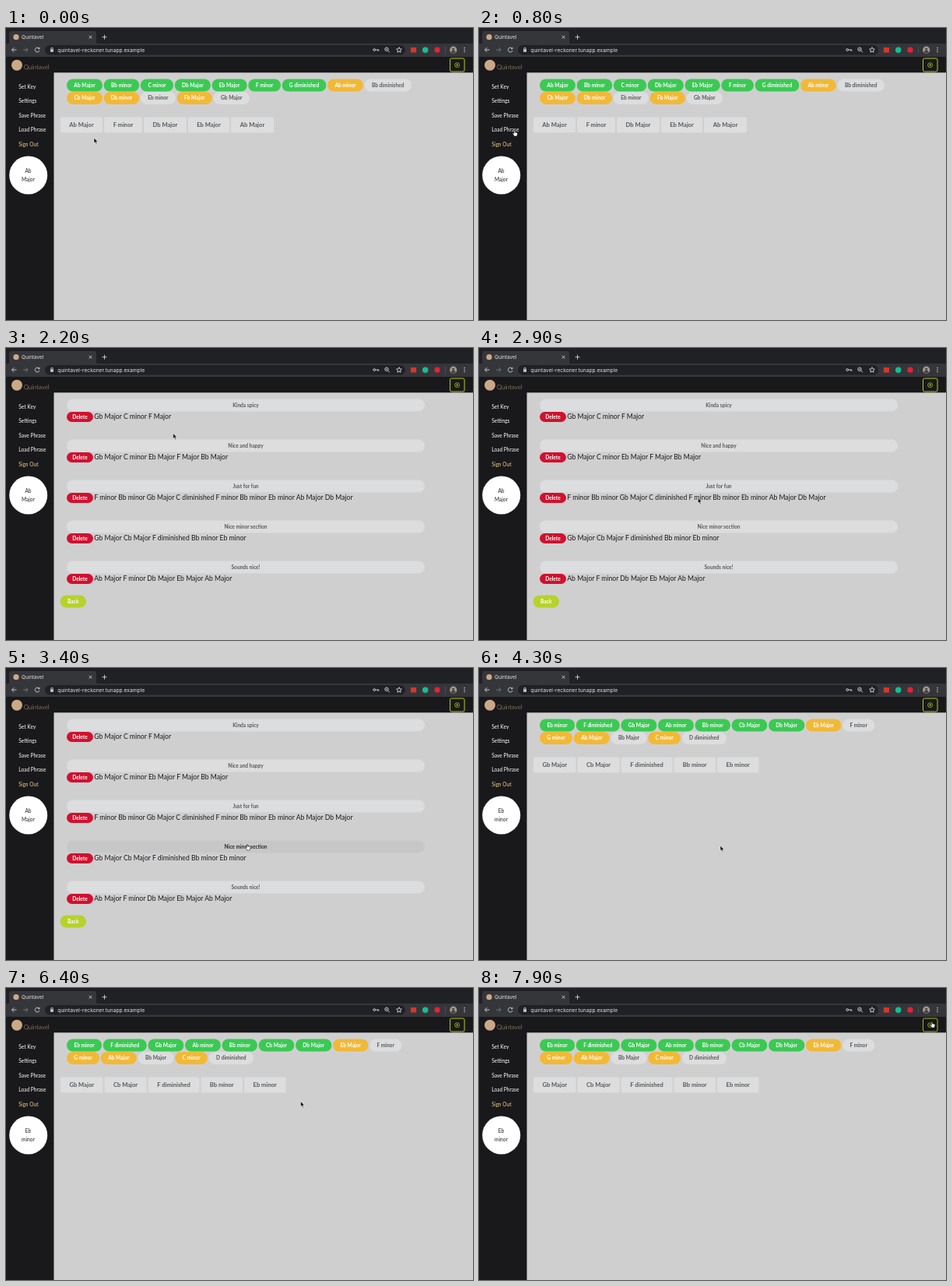
Recreate the animation shown at these times as an HTML page. Size 600x375 px, loop 8 s.

```html
<!DOCTYPE html>
<html lang="en">
<head>
<meta charset="utf-8">
<title>Quintavel</title>
<style>
  html, body { margin: 0; width: 100%; height: 100%; overflow: hidden; background: #d0cfd0; }
  svg { display: block; width: 600px; height: 375px; font-family: Lato, sans-serif; }
  text { pointer-events: none; white-space: pre; }
  text.hot { pointer-events: auto; }
  rect.on { filter: brightness(.9); }
  .grey.on + text { fill: #2b2b2c; }
  .line { fill: none; stroke: #d5d7da; stroke-width: .9; }
  .ui { font-family: Inter, sans-serif; }
  #cursor { pointer-events: none; }
</style>
</head>
<body>
<svg id="stage" viewBox="0 0 600 375"></svg>
<script>
const GREEN = '#3bc954', AMBER = '#f2b937', GREY = '#dcddde', INK = '#58595a', TAN = '#cba984';
const LOOP = 8000, LIST_AT = 1200, NEW_KEY_AT = 4200;

const rect = (x, y, w, h, fill, r = 0, extra = '') =>
  `<rect x="${x}" y="${y}" width="${w}" height="${h}" rx="${r}" fill="${fill}" ${extra}/>`;
const circle = (x, y, r, fill) => `<circle cx="${x}" cy="${y}" r="${r}" fill="${fill}"/>`;
const line = (d, extra = '') => `<path class="line" d="${d}" ${extra}/>`;
// Text is placed by the vertical centre of its capitals.
const text = (x, y, size, fill, str, extra = '') =>
  `<text x="${x}" y="${y + size * .36}" font-size="${size}" fill="${fill}" ${extra}>${str}</text>`;

function button(x, y, w, h, fill, label, size = 6.6, r = h / 2) {
  const grey = fill === GREY;
  return rect(x, y, w, h, fill, r, `class="hot ${grey ? 'grey' : ''}"`) +
    text(x + w / 2, y + h / 2, size, grey ? INK : '#fff', label, 'font-weight="700" text-anchor="middle"');
}

// Each edge list holds the left side of every button plus the end of the row.
function row(labels, edges, y, h, fillOf, gap, size, r) {
  return labels.split(',').map((label, i) =>
    button(edges[i], y, edges[i + 1] - edges[i] - gap, h, fillOf(i), label, size, r)).join('');
}

function chordScene(id, key, top, topEdges, nextFrom, low, lowEdges, phrase, phraseEdges) {
  const [root, mode] = key.split(' ');
  const middle = 'text-anchor="middle"';
  return `<g id="${id}">` +
    row(top, topEdges, 65.5, 16, i => i < 7 ? GREEN : i === 7 ? AMBER : GREY, 1.6) +
    row(low, lowEdges, 82, 16, i => nextFrom.includes(i) ? AMBER : GREY, 1.6) +
    row(phrase, phraseEdges, 114.5, 20, () => GREY, 2, 7.6, 1.5) +
    `</g><g id="${id}Key">` + text(28.5, 183.5, 6.6, '#222', root, middle) +
    text(28.5, 195, 6.6, '#222', mode, middle) + '</g>';
}

const saved = [
  ['Kinda spicy', 'Gb Major C minor F Major'],
  ['Nice and happy', 'Gb Major C minor Eb Major F Major Bb Major'],
  ['Just for fun', 'F minor Bb minor Gb Major C diminished F minor Bb minor Eb minor Ab Major Db Major'],
  ['Nice minor section', 'Gb Major Cb Major F diminished Bb minor Eb minor'],
  ['Sounds nice!', 'Ab Major F minor Db Major Eb Major Ab Major']
];

const listScene = '<g id="list">' + saved.map(([title, chords], i) => {
  const y = 65.5 + i * 52;
  return button(78, y, 460, 16, GREY, title) +
    button(78, y + 16.5, 34, 13, '#d0112f', 'Delete') +
    text(113.3, y + 22.5, 8.65, '#18181a', chords);
}).join('') + button(69.5, 317.5, 33.5, 16, '#b6d22c', 'Back') + '</g>';

const browser =
  rect(0, 0, 600, 21, '#202124') +
  '<path d="M1 21Q4 21 4 18V7Q4 4 7 4H113Q116 4 116 7V18Q116 21 119 21Z" fill="#35363a"/>' +
  rect(0, 20, 600, 17, '#35363a') + rect(50, 22, 463, 12.5, '#202124', 6.2) +
  circle(13, 11.7, 3.6, TAN) +
  text(20, 11.7, 6.4, '#dfe1e5', 'Quintavel', 'class="ui"') +
  line('M106.7 9.9l3.6 3.6m0-3.6l-3.6 3.6M123.5 11.7h6m-3-3v6') +
  line('M13.5 28H7.5m2.8-2.8L7.5 28l2.8 2.8') +
  line('M22 28h6m-2.8-2.8L28 28l-2.8 2.8', 'opacity=".4"') +
  line('M42.5 26.2A2.9 2.9 0 1 0 43 29M43 24.8v2h-2') +
  rect(57, 27.3, 4, 3.4, '#c4c7cb', .5) + line('M57.8 27.5v-1a1.2 1.2 0 0 1 2.4 0v1', 'stroke-width=".7"') +
  text(66.3, 28.2, 6.7, '#e2e4e7', 'quintavel-reckoner.tunapp.example', 'class="ui"') +
  line('M474.8 28h4v1.6m-1.3-1.6v1.3M471.8 28a1.4 1.4 0 1 1 2.8 0a1.4 1.4 0 1 1-2.8 0') +
  line('M486.8 27.3a2.2 2.2 0 1 1 4.4 0a2.2 2.2 0 1 1-4.4 0M490.7 29l2.2 2.3M488 27.3h2') +
  line('M505 24.7l1 2.2 2.4.3-1.8 1.6.5 2.4-2.1-1.2-2.1 1.2.5-2.4-1.8-1.6 2.4-.3Z', 'stroke-width=".7"') +
  rect(520, 25, 7, 6.5, '#d8352f') + circle(538.7, 28.2, 3.7, '#18bd91') + circle(554, 28.2, 3.6, '#df2338') +
  rect(564.3, 23.5, .6, 9, '#5b5d61') +
  circle(574.7, 28.2, 4.6, '#a39a94') + circle(574.7, 27, 1.5, '#4d423e') +
  '<path d="M571.8 31.6q0-3 2.9-3t2.9 3q-2.9 2-5.8 0" fill="#4d423e"/>' +
  [25.4, 28, 30.6].map(y => circle(589, y, .75, '#d5d7da')).join('');

const menu = ['Set Key', 'Settings', 'Save Phrase', 'Load Phrase', 'Sign Out'].map((label, i) =>
  text(16.3, 75.3 + i * 18.5, 6.6, i === 4 ? '#f3d08a' : '#fff', label, 'class="hot"')).join('');

const frame =
  rect(0, 37, 600, 20.3, '#19191b') + rect(0, 57, 61.5, 318, '#19191c') +
  circle(14, 47.8, 7, TAN) + text(22.8, 50.2, 7.9, TAN, 'Quintavel', 'font-weight="300"') +
  rect(570.5, 39, 18.5, 17, '#19191b', 2, 'class="hot" stroke="#b5cc18"') +
  '<g pointer-events="none"><circle cx="579.6" cy="47.6" r="2.9" fill="none" stroke="#b5cc18" stroke-width=".8"/>' +
  '<path d="M578.8 46.1v3l2.4-1.5Z" fill="#b5cc18"/></g>' +
  menu + circle(28.7, 189, 24.5, '#fff');

const pointer = '<g id="cursor">' +
  '<path id="arrow" d="M0 0V7.1L1.6 5.6 2.7 8.2 3.9 7.7 2.8 5.2H5Z" fill="#111" stroke="#fff" stroke-width=".55"/>' +
  '<path id="hand" d="M-.7-1.1q.7-.8 1.3 0l.2 2 .9.1.9.3.9.3.5.7-.5 2.5-.6 1.2H-.1L-1.3 4.3-2.5 2.3q.2-.8 1-.3l.9.8Z" fill="#fff" stroke="#111" stroke-width=".6"/></g>';

const stage = document.getElementById('stage');
stage.innerHTML = rect(0, 0, 600, 375, '#d0cfd0') + browser + frame +
  chordScene('flat', 'Ab Major',
    'Ab Major,Bb minor,C minor,Db Major,Eb Major,F minor,G diminished,Ab minor,Bb diminished',
    [78, 125.6, 172.8, 216.7, 264.5, 311.3, 354.6, 413, 460.5, 522.5], [0, 1, 3],
    'Cb Major,Db minor,Eb minor,Fb Major,Gb Major', [78, 125.6, 172.8, 219.6, 266.6, 314.6],
    'Ab Major,F minor,Db Major,Eb Major,Ab Major', [70, 126, 177, 234, 289, 346]) +
  chordScene('minor', 'Eb minor',
    'Eb minor,F diminished,Gb Major,Ab minor,Bb minor,Cb Major,Db Major,Eb Major,F minor',
    [78, 124.7, 182.4, 230, 277.5, 324.6, 372, 420, 467, 510], [0, 1, 3],
    'G minor,Ab Major,Bb Major,C minor,D diminished', [78, 121.7, 169.5, 217.2, 260.6, 319.6],
    'Gb Major,Cb Major,F diminished,Bb minor,Eb minor', [70, 126.5, 182.7, 250.5, 306, 361.5]) +
  listScene + pointer;

const $ = id => document.getElementById(id);
const show = (id, visible) => { $(id).style.display = visible ? '' : 'none'; };

// Time, x, y of the pointer tip.
const path = [
  [0, 113, 141], [800, 45.5, 133], [1200, 45.5, 133], [2200, 214.7, 109.5],
  [3300, 310, 228], [4300, 310, 228], [6400, 378.5, 145.5], [7800, 582, 45], [LOOP, 582, 45]
];

function pointerAt(t) {
  const i = path.findIndex(key => key[0] > t);
  const [t0, x0, y0] = path[i - 1], [t1, x1, y1] = path[i];
  const p = (t - t0) / (t1 - t0), e = p * p * (3 - 2 * p);
  return [x0 + (x1 - x0) * e, y0 + (y1 - y0) * e];
}

function draw(now) {
  const t = Math.floor(now % LOOP / 100) * 100;
  const renewed = t >= NEW_KEY_AT, listed = t >= LIST_AT && !renewed;
  show('flat', t < LIST_AT);
  show('list', listed);
  show('minor', renewed);
  show('flatKey', !renewed);
  show('minorKey', renewed);

  const [x, y] = pointerAt(t);
  const hit = document.elementFromPoint(x, y)?.closest('.hot');
  stage.querySelectorAll('.on').forEach(el => el.classList.remove('on'));
  hit?.classList.add('on');
  $('cursor').setAttribute('transform', `translate(${x} ${y})`);
  show('arrow', !hit);
  show('hand', hit);
}

const start = performance.now();
function tick() {
  draw(performance.now() - start);
  requestAnimationFrame(tick);
}
tick();
</script>
</body>
</html>
```
